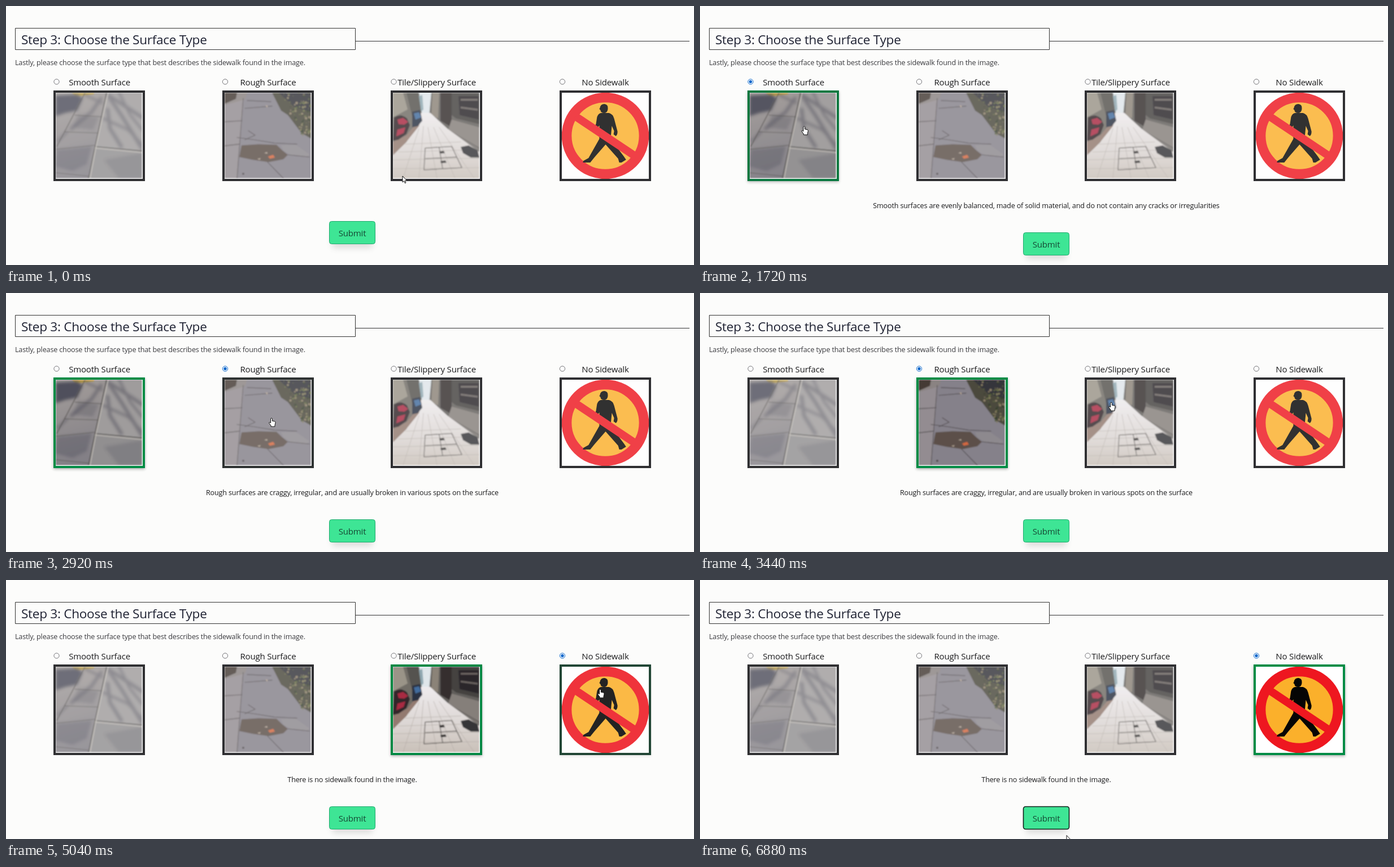
Animation of 1218x460 px, one loop 6920 ms. Source, as an HTML page:

```html
<!DOCTYPE html>
<html lang="en">
<head>
<meta charset="utf-8">
<title>Surface type form</title>
<style>
html, body { margin: 0; width: 100%; height: 100%; overflow: hidden; background: #fcfcfb; }
#stage { display: block; width: 1218px; height: 460px; }
text { font-family: "Open Sans", "Noto Sans", sans-serif; letter-spacing: -.013em; fill: #1c1c1e; }
.mid { text-anchor: middle; }
.title { font-size: 22.6px; fill: #1f2233; }
.note { font-size: 12.6px; }
.label { font-size: 15.04px; }
.line { fill: none; stroke-linecap: round; stroke-linejoin: round; }
</style>
</head>
<body>
<svg id="stage" viewBox="0 0 1218 460">
  <defs>
    <filter id="soft" x="0" y="0" width="100%" height="100%"><feGaussianBlur stdDeviation=".9"/></filter>
    <filter id="haze" x="-30%" y="-30%" width="160%" height="160%"><feGaussianBlur stdDeviation="2.5"/></filter>
    <filter id="glow" x="-30%" y="-60%" width="160%" height="220%"><feGaussianBlur stdDeviation="6"/></filter>
    <linearGradient id="slab" x1="0" y1="0" x2=".3" y2="1">
      <stop offset="0" stop-color="#a39d9a"/><stop offset="1" stop-color="#817e85"/>
    </linearGradient>
    <linearGradient id="lane" x1="0" y1="0" x2="0" y2="1">
      <stop offset="0" stop-color="#eeebed"/><stop offset=".6" stop-color="#dbd5d2"/><stop offset="1" stop-color="#c9c0b8"/>
    </linearGradient>

    <g id="pic0">
      <rect width="153" height="153" fill="url(#slab)"/>
      <path d="M90 0H153V153H60Z" fill="#9f9c9c"/>
      <path d="M68 97L153 105V153H60Z" fill="#918f90"/>
      <path d="M28 0H68V3L36 7Z" fill="#b59a4c"/>
      <g fill="#4f4f5c" filter="url(#haze)">
        <path d="M0 5L38 3L48 10L38 32L18 36L0 42Z"/>
        <path d="M2 102L64 96L55 128L30 140L0 132Z" opacity=".4"/>
        <path d="M86 120L153 108V153H112Z" opacity=".25"/>
        <path d="M40 38L76 44L66 66L30 62Z" opacity=".3"/>
      </g>
      <g class="line" stroke="#565560" opacity=".55" filter="url(#haze)">
        <path d="M92 4L116 40L153 100M96 6L153 44M80 10L64 34L28 64M92 30L96 64L116 96" stroke-width="6"/>
        <path d="M112 0L132 40L153 66M52 4L82 18M84 46L128 66L153 92M20 70L4 86" stroke-width="4"/>
      </g>
      <g class="line" stroke="#55524f">
        <path d="M90 0L70 94L58 153" stroke-width="1.6"/>
        <path d="M52 0L2 96M70 96L153 104" stroke-width="1.3"/>
        <path d="M34 40L82 43M16 70L75 72M0 101L68 94M0 143L58 149" stroke-width=".8"/>
      </g>
      <path class="line" d="M93 0L72 94L61 153M70 99L153 107" stroke="#bdb8b2" stroke-width="1.6"/>
    </g>

    <g id="pic1">
      <rect width="153" height="153" fill="#85818a"/>
      <path d="M0 20L34 10L22 153H0Z" fill="#938c91"/>
      <path d="M0 0H40L36 12L0 22Z" fill="#8a8382"/>
      <path d="M0 0H22L20 11L0 20Z" fill="#443b36"/>
      <path d="M84 0H153V82L136 72L112 40L100 32Z" fill="#4b493e"/>
      <path d="M96 0H153V34L124 26Z" fill="#34343a"/>
      <g id="leaves"></g>
      <path d="M30 94L60 92L92 93L102 103L112 111L104 119L78 124L50 120L26 115Z" fill="#5b5049"/>
      <path d="M100 94L126 93L150 110L146 114L118 112L104 103Z" fill="#8d898e"/>
      <path class="line" d="M33 10L22 153M40 14L82 16M36 28L84 24M0 52L31 50M22 80L52 84L88 90L128 92M112 111L150 115M76 124L104 153M42 68L54 76L36 84M0 95L26 92" stroke="#4f4a4d" stroke-width="1.1"/>
      <path d="M77 114L86 111L89 116L80 118Z" fill="#d2683f"/>
      <path d="M70 108l5-2 1 3ZM58 118l6-1-2 3ZM72 23l4 0 0 4Z" fill="#b5a596"/>
      <circle cx="33" cy="145" r="1.8" fill="#3c3739"/>
    </g>

    <g id="pic2">
      <rect width="153" height="153" fill="#77726e"/>
      <path d="M46 0H70L66 46H52Z" fill="#dfe6ea"/>
      <path d="M0 0H44L52 40L20 86L0 104Z" fill="#716d66"/>
      <path d="M0 0H18L26 30L0 44Z" fill="#9a9488"/>
      <path d="M24 0H46L50 34L34 42Z" fill="#55534f"/>
      <path d="M46 6L52 4L54 30L50 34Z" fill="#8fa7b0"/>
      <path d="M68 0H153V100L92 62L64 42Z" fill="#625e5b"/>
      <path d="M70 0H82L80 46L68 40Z" fill="#8b8378"/>
      <path d="M84 0H104L104 62L84 50Z" fill="#352f2f"/>
      <path d="M104 0H153V56L112 46L104 40Z" fill="#454241"/>
      <path d="M116 6H152V48L118 40Z" fill="#29282c"/>
      <path d="M120 11H150V14H120ZM120 25L150 29V32L120 28Z" fill="#6b6461"/>
      <path d="M104 48L153 62V98L98 66Z" fill="#857f7a"/>
      <path d="M50 36L66 36L96 64L153 106V153H0V110L24 88Z" fill="url(#lane)"/>
      <path d="M0 88L24 76L50 44L46 60L22 90L0 112Z" fill="#937a70"/>
      <path d="M2 44Q14 36 25 46L30 58L24 74L10 84L0 86Z" fill="#33272b"/>
      <path d="M8 48L18 45L27 52L20 57L10 56ZM8 66L22 62L19 72L6 78Z" fill="#a82b42"/>
      <path d="M34 34L48 31L52 50L44 60L34 62Z" fill="#2a3342"/>
      <path d="M37 37L46 35L50 44L40 48Z" fill="#426c9d"/>
      <path class="line" d="M22 92L120 88M10 106L146 102M0 120L153 117M0 136L153 134M46 64L18 153M54 60L46 153M62 62L78 153M72 62L110 153M82 62L144 153" stroke="#b0a9a3" stroke-width=".7"/>
      <path class="line" d="M57 99L104 96L122 134L55 138ZM58 118L113 115M82 98L88 136" stroke="#5d5956" stroke-width="1.3"/>
      <path d="M82 105L90 104L92 108L83 109ZM84 122L93 121L95 125L85 126Z" fill="#302e2e"/>
      <path d="M120 97L134 94L150 103L153 116L138 116L124 108Z" fill="#363538"/>
    </g>

    <g id="pic3">
      <rect width="153" height="153" fill="#fff"/>
      <circle cx="76.5" cy="76.5" r="68" fill="#fbb02b" stroke="#ee1720" stroke-width="17.5"/>
      <g fill="#050505">
        <path d="M67 27Q68 20 75 20Q82 21 81 29Q80 36 75 36Q68 36 68 31L66 29Z"/>
        <path d="M69 36H83Q90 38 92 46L98 69Q98 75 95 77L91 74L92 68L88 59L86 80L97 97L109 113L113 119L105 124L101 124L99 117L77 92L58 114L50 124H37L38 121L47 116L66 82L66 58L58 71L53 68L60 56L62 43Q64 37 69 36Z"/>
      </g>
      <path d="M24 42L131 114" stroke="#ee1720" stroke-width="14"/>
    </g>
  </defs>

  <rect width="1218" height="460" fill="#fcfcfb"/>
  <path d="M16.5 39.5H618.5V77.5H16.5ZM618.5 62.5H1210" fill="none" stroke="#333"/>
  <text class="title" x="27" y="68">Step 3: Choose the Surface Type</text>
  <text class="note" x="16" y="105.3" style="fill:#3b3b3f">Lastly, please choose the surface type that best describes the sidewalk found in the image.</text>
  <g id="cards"></g>
  <text id="desc" class="note mid" x="613" y="358.6"></text>
  <g id="button">
    <rect id="btnShade" x="577" y="396" width="72" height="34" rx="5" filter="url(#glow)"/>
    <rect id="btn" x="572.5" y="382.5" width="81" height="40" rx="4"/>
    <text id="btnText" class="label mid" x="613" y="408.8">Submit</text>
  </g>
  <g id="cursor" fill="#fff" stroke="#111" stroke-width="1" stroke-linejoin="round">
    <path id="arrow" d="M0 0V11L2.6 8.8L4.3 12.7L6 12L4.3 8.2H7.8Z"/>
    <path id="hand" d="M-1.4 1Q0 -.8 1.4 1V5.2L5.8 6Q7.2 6.5 7 8.5L6 12.8V15.2H-1V13.4L-4.2 9.2Q-4.5 7.2 -2.8 7.6L-1.4 9Z"/>
    <path id="beam" d="M-2 -5.5H2M0 -5.5V5.5M-2 5.5H2" fill="none"/>
  </g>
</svg>
<script>
const LOOP = 6920, COLUMN = 298.5, CARD_W = 162, CARD_H = 161;
const $ = id => document.getElementById(id);
const clamp = v => Math.min(1, Math.max(0, v));
const ramp = (t, start, span) => clamp((t - start) / span);
const smooth = u => u * u * (3 - 2 * u);
const mix = (a, b, u) => `rgb(${a.map((v, i) => Math.round(v + (b[i] - v) * u))})`;

// half: half the width of the description, for the text cursor
const options = [
  { label: 'Smooth Surface', pick: 1560, half: 306,
    desc: 'Smooth surfaces are evenly balanced, made of solid material, and do not contain any cracks or irregularities' },
  { label: 'Rough Surface', pick: 2900, half: 259,
    desc: 'Rough surfaces are craggy, irregular, and are usually broken in various spots on the surface' },
  { label: 'Tile/Slippery Surface', pick: 3660, half: 250,
    desc: 'Tile surfaces are polished or slick, and can become slippery when they are wet' },
  { label: 'No Sidewalk', pick: 4960, half: 115,
    desc: 'There is no sidewalk found in the image.' }
];
// card edges sit on whole pixels
const cardX = i => Math.round(84.4 + i * COLUMN);

// time, x, y of the pointer tip
const path = [
  [0, 702, 302], [160, 702, 302], [900, 150, 152], [1080, 141.5, 148], [1440, 166, 205],
  [1640, 166, 205], [2200, 490, 357], [2360, 519, 355.5], [2460, 524, 354], [2820, 470, 222],
  [2960, 470, 222], [3400, 728, 194], [3720, 728, 194], [4160, 690, 355], [4360, 720, 355],
  [4860, 1052, 194], [5100, 1052, 194], [5640, 632, 419], [6480, 633, 420],
  [6880, 649, 453.5], [6920, 651, 459]
];

function buildCards() {
  $('cards').innerHTML = options.map((o, i) => {
    const x = cardX(i), photo = i < 3;
    const ringX = 89.5 + i * COLUMN, inW = CARD_W - 8, inH = CARD_H - 8;
    return `<circle id="ring${i}" cx="${ringX}" cy="134.5" r="4.6" fill="#fff"/>
      <circle id="dot${i}" cx="${ringX}" cy="134.5" r="2.7" fill="#0d68cc"/>
      <text class="label mid" x="${165.5 + i * COLUMN}" y="140.8">${o.label}</text>
      <rect id="shade${i}" x="${x}" y="152" width="${CARD_W}" height="${CARD_H}" filter="url(#haze)"/>
      <rect x="${x}" y="150" width="${CARD_W}" height="${CARD_H}" fill="#fcfcfb"/>
      <g id="card${i}">
        <rect x="${x + 4}" y="154" width="${inW}" height="${inH}" fill="#fff"/>
        <svg x="${x + 4}" y="154" width="${inW - photo}" height="${inH - photo}" viewBox="0 0 153 153" preserveAspectRatio="none">
          <use href="#pic${i}" ${photo ? 'filter="url(#soft)"' : ''}/>
        </svg>
        <rect id="edge${i}" x="${x + 2}" y="152" width="${CARD_W - 4}" height="${CARD_H - 4}" fill="none" stroke-width="4"/>
      </g>`;
  }).join('');
}

function buildLeaves() {
  let seed = 7;
  const rnd = () => (seed = seed * 16807 % 2147483647) / 2147483647;
  const tones = ['#6b7048', '#39412f', '#80795a', '#555c3c', '#8d8069'];
  let out = '';
  for (let i = 0; i < 90; i++) {
    const y = rnd() * 76, left = 96 + y * .55;
    out += `<circle cx="${left + rnd() * (153 - left)}" cy="${y}" r="${.7 + rnd() * 1.6}" fill="${tones[i % 5]}"/>`;
  }
  $('leaves').innerHTML = out;
}

function pointer(t) {
  let i = 1;
  while (i < path.length - 1 && path[i][0] < t) i++;
  const [t0, x0, y0] = path[i - 1], [t1, x1, y1] = path[i];
  const u = smooth(ramp(t, t0, t1 - t0));
  return [x0 + (x1 - x0) * u, y0 + (y1 - y0) * u];
}

function pointerKind(t, x, y, chosen, shift) {
  if (t < 100) return 'arrow';
  const onCard = options.some((o, i) => x >= cardX(i) && x <= cardX(i) + CARD_W) && y > 126 && y < 311;
  const onButton = x > 572 && x < 654 && y > 382 + shift && y < 423 + shift;
  if (onCard || onButton) return 'hand';
  const onText = chosen >= 0 && Math.abs(x - 613) < options[chosen].half && y > 345 && y < 363;
  return onText ? 'beam' : 'arrow';
}

function drawCard(i, t, chosen) {
  const next = options[i + 1];
  const shown = ramp(t, options[i].pick, 220);
  const hidden = next ? ramp(t, next.pick + 60, 220) : 0;
  const p = smooth(shown) * (1 - smooth(hidden));
  const on = i === chosen;
  $('card' + i).setAttribute('opacity', .82 + .18 * p);
  $('edge' + i).setAttribute('stroke', mix([3, 3, 6], [0, 140, 69], p));
  $('shade' + i).setAttribute('opacity', .3 * p);
  $('ring' + i).setAttribute('stroke', on ? '#0d68cc' : '#707074');
  $('dot' + i).setAttribute('opacity', on ? 1 : 0);
}

function drawButton(t, shift) {
  const hover = smooth(ramp(t, 5565, 150)) * (1 - smooth(ramp(t, 6725, 150)));
  const focus = t >= 6000;
  $('button').setAttribute('transform', `translate(0 ${shift})`);
  $('btn').setAttribute('fill', mix([62, 229, 149], [15, 166, 97], hover));
  $('btn').setAttribute('stroke', focus ? '#10201a' : mix([32, 170, 110], [15, 166, 97], hover));
  $('btn').setAttribute('stroke-width', focus ? 1.6 : 1);
  $('btnText').style.fill = mix([22, 72, 52], [208, 243, 225], hover);
  $('btnShade').setAttribute('opacity', .12 - .07 * hover);
}

function draw(t) {
  const chosen = options.filter(o => t >= o.pick).length - 1;
  const shift = chosen < 0 ? 0 : 20;
  options.forEach((o, i) => drawCard(i, t, chosen));
  $('desc').textContent = chosen < 0 ? '' : options[chosen].desc;
  drawButton(t, shift);
  const [x, y] = pointer(t);
  const kind = pointerKind(t, x, y, chosen, shift);
  $('cursor').setAttribute('transform', `translate(${x} ${y})`);
  for (const k of ['arrow', 'hand', 'beam']) $(k).setAttribute('visibility', k === kind ? 'visible' : 'hidden');
}

buildCards();
buildLeaves();
const start = performance.now();
function tick() {
  draw((performance.now() - start) % LOOP);
  requestAnimationFrame(tick);
}
tick();
</script>
</body>
</html>
```
